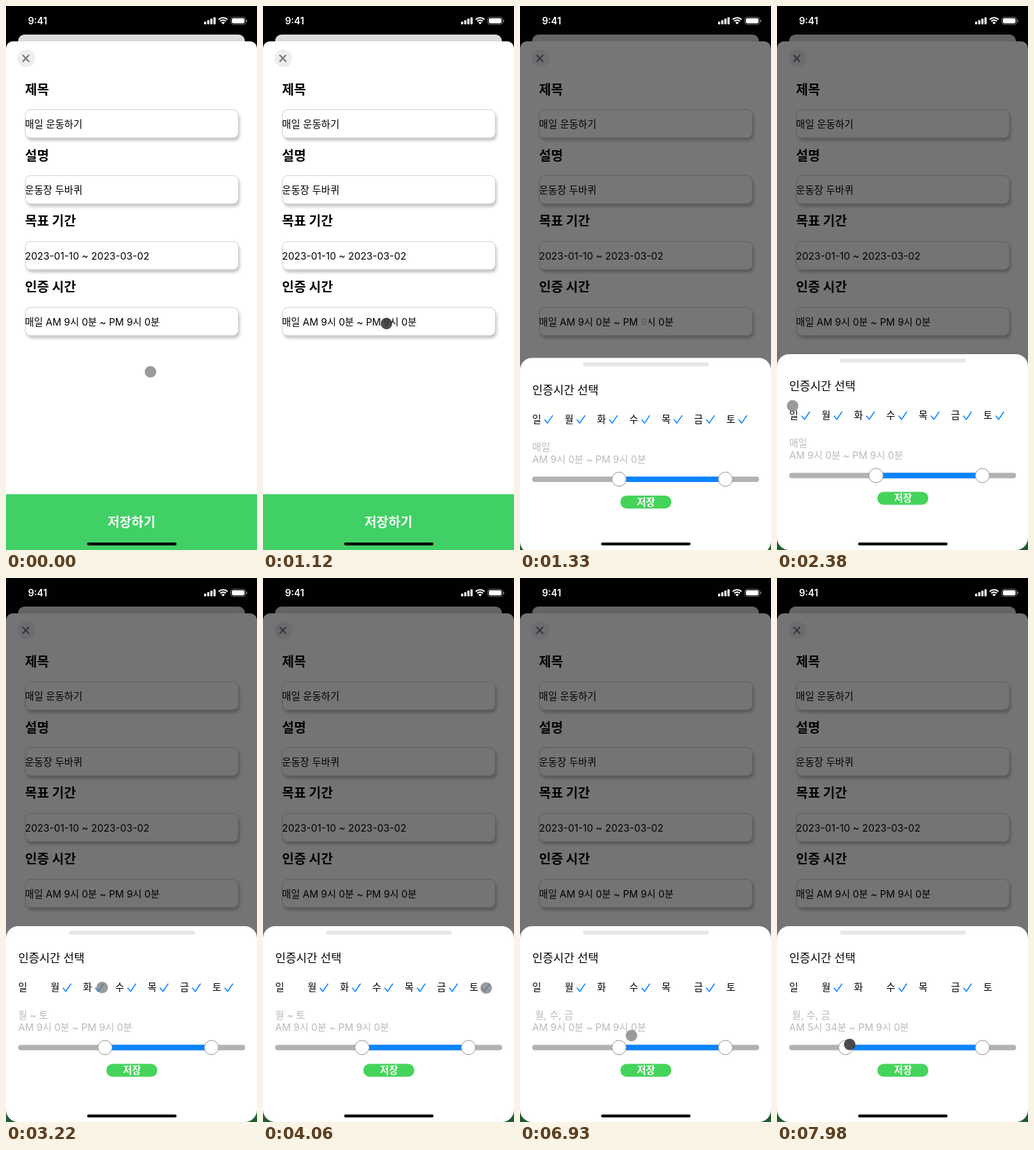
An HTML page with a canvas for the animation above (8 s loop, 370 by 800 pixels).

```html
<!DOCTYPE html>
<html lang="ko">
<head>
<meta charset="utf-8">
<title>인증시간 선택</title>
<style>
html, body { margin: 0; width: 100%; height: 100%; overflow: hidden; background: #000; }
canvas { display: block; width: 370px; height: 800px; }
</style>
</head>
<body>
<canvas id="stage"></canvas>
<script>
const W = 370, H = 800, LOOP = 8000, STEP = 70;
const FONT = 'Inter, "Noto Sans CJK KR", "Noto Sans CJK", sans-serif';
const BLUE = '#0a84ff', GREEN = '#40d066';
const canvas = document.getElementById('stage');
const ctx = canvas.getContext('2d');
const dpr = window.devicePixelRatio || 1;
canvas.width = W * dpr;
canvas.height = H * dpr;

const DAYS = [...'일월화수목금토'];
const OPEN_AT = 1130, DRAG_AT = 7210, DRAG_END = 7980;
const UNCHECK = { 0: 2730, 6: 4270, 2: 5390, 4: 6370 };
const PRESSES = [[1050, 1190], [2590, 2730], [4130, 4270], [5250, 5390], [6230, 6370], [7140, 9000]];
// time, x, y of the touch dot
const PATH = [
  [0, 213, 538], [560, 193, 488], [630, 193, 488], [1050, 182, 467],
  [1610, 182, 466], [2380, 23, 588], [2590, 40, 602], [2800, 40, 602],
  [3850, 329, 603], [4340, 329, 603], [5180, 137, 604], [5600, 137, 604],
  [6200, 231, 603], [6510, 231, 603], [7070, 152, 686], [8000, 152, 686]
];

const clamp = v => Math.max(0, Math.min(1, v));
const smooth = u => u * u * (3 - 2 * u);

function rect(x, y, w, h, r, fill) {
  ctx.beginPath();
  ctx.roundRect(x, y, w, h, r);
  ctx.fillStyle = fill;
  ctx.fill();
}

function circle(x, y, r, fill) {
  ctx.beginPath();
  ctx.arc(x, y, r, 0, Math.PI * 2);
  ctx.fillStyle = fill;
  ctx.fill();
}

function line(points, color, width) {
  ctx.beginPath();
  points.forEach(p => ctx.lineTo(p[0], p[1]));
  ctx.strokeStyle = color;
  ctx.lineWidth = width;
  ctx.lineCap = ctx.lineJoin = 'round';
  ctx.stroke();
}

// y is the middle of the line of text
function text(str, x, y, size, weight = 400, color = '#000', align = 'left') {
  ctx.font = `${weight} ${size}px ${FONT}`;
  ctx.textAlign = align;
  ctx.fillStyle = color;
  ctx.fillText(str, x, y + size * 0.37);
}

function statusBar() {
  text('9:41', 46.5, 21.5, 14, 600, '#fff', 'center');
  for (let i = 0; i < 4; i++) {
    const h = 4 + i * 2.2;
    rect(292 + i * 4.6, 27 - h, 3.2, h, 1, '#fff');
  }
  ctx.strokeStyle = '#fff';
  ctx.lineCap = 'butt';
  ctx.lineWidth = 2.1;
  for (const r of [9.2, 5.8]) {
    ctx.beginPath();
    ctx.arc(320, 26.5, r, -Math.PI * 0.75, -Math.PI * 0.25);
    ctx.stroke();
  }
  ctx.beginPath();
  ctx.moveTo(320, 27);
  ctx.arc(320, 27, 3.6, -Math.PI * 0.75, -Math.PI * 0.25);
  ctx.fillStyle = '#fff';
  ctx.fill();
  ctx.beginPath();
  ctx.roundRect(331.5, 16.5, 21.5, 10.5, 3.2);
  ctx.strokeStyle = 'rgba(255,255,255,.45)';
  ctx.lineWidth = 1;
  ctx.stroke();
  rect(333, 18, 18.5, 7.5, 2, '#fff');
  rect(354, 20, 1.4, 4, 0.7, 'rgba(255,255,255,.5)');
}

function field(i, title, value, size) {
  const y = 152.5 + i * 96.9;
  text(title, 28, y - 30, 19.2, 700);
  ctx.save();
  ctx.shadowColor = 'rgba(0,0,0,.24)';
  ctx.shadowBlur = 4 * dpr;
  ctx.shadowOffsetX = 2 * dpr;
  ctx.shadowOffsetY = 4 * dpr;
  rect(28.5, y, 314, 41.5, 8, '#fff');
  ctx.restore();
  ctx.strokeStyle = '#d2d2d4';
  ctx.lineWidth = 1;
  ctx.stroke();
  text(value, 28, y + 21, size);
}

function form() {
  rect(18, 42, 334, 30, 9, '#dcdcdc');
  rect(0, 52, W, H, 10, '#fff');
  circle(30, 77, 13, '#eeeeef');
  line([[25, 72.5], [33.5, 81.5]], '#77777c', 2);
  line([[33.5, 72.5], [25, 81.5]], '#77777c', 2);
  field(0, '제목', '매일 운동하기', 14.6);
  field(1, '설명', '운동장 두바퀴', 14.6);
  field(2, '목표 기간', '2023-01-10 ~ 2023-03-02', 14.6);
  field(3, '인증 시간', '매일 AM 9시 0분 ~ PM 9시 0분', 14.4);
  ctx.fillStyle = GREEN;
  ctx.fillRect(0, 718, W, 82);
  text('저장하기', 185, 759, 19.2, 700, '#fff', 'center');
}

function dayLabel(on) {
  const picked = DAYS.map((d, i) => i).filter(i => on[i]);
  const first = picked[0], last = picked[picked.length - 1];
  if (picked.length === 7) return '매일';
  if (last - first === picked.length - 1) return `${DAYS[first]} ~ ${DAYS[last]}`;
  return ' ' + picked.map(i => DAYS[i]).join(', ');
}

function clock(min) {
  const h = Math.floor(min / 60);
  return `${h < 12 ? 'AM' : 'PM'} ${h > 12 ? h - 12 : h}시 ${min % 60}분`;
}

const sliderX = min => 28.4 + min / 60 * 13.07;

function sheet(t, top, from) {
  const to = 21 * 60;
  const on = DAYS.map((d, i) => !(t >= UNCHECK[i]));
  ctx.save();
  ctx.translate(0, top);
  rect(0, 0, W, 288, 18, '#fff');
  rect(93, 6.5, 185.5, 6, 3, '#e7e7ea');
  text('인증시간 선택', 18, 47, 16.9, 500);
  DAYS.forEach((d, i) => {
    const x = 18 + i * 47.7;
    text(d, x, 90, 14.4);
    if (on[i]) line([[x + 18.5, 91], [x + 22.5, 96], [x + 30, 85]], BLUE, 1.5);
  });
  text(dayLabel(on), 18, 131, 14.4, 400, '#bababa');
  text(`${clock(from)} ~ ${clock(to)}`, 18, 149, 14.4, 400, '#bababa');
  const a = sliderX(from), b = sliderX(to);
  rect(18, 174.5, 334.5, 8, 4, '#b2b2b2');
  rect(a, 174.5, b - a, 8, 0, BLUE);
  for (const x of [a, b]) {
    circle(x, 178.5, 10.5, '#fff');
    ctx.strokeStyle = '#969696';
    ctx.lineWidth = 1;
    ctx.stroke();
  }
  rect(148, 202.5, 75, 19, 9, '#45d45b');
  text('저장', 185.7, 211.8, 14.4, 700, '#fff', 'center');
  ctx.restore();
}

function dotAt(t) {
  let i = 0;
  while (i < PATH.length - 2 && PATH[i + 1][0] <= t) i++;
  const [t0, x0, y0] = PATH[i], [t1, x1, y1] = PATH[i + 1];
  const u = smooth(clamp((t - t0) / (t1 - t0)));
  return [x0 + (x1 - x0) * u, y0 + (y1 - y0) * u];
}

function dot(t, from) {
  let [x, y] = dotAt(t);
  if (t >= DRAG_AT) x = sliderX(from) + 6;
  const press = Math.max(...PRESSES.map(([a, b]) =>
    Math.min(clamp((t - a) / 70 + 0.5), clamp((b - t) / 70 + 0.5))));
  const shade = 120 - 64 * press;
  circle(x, y, 8.5, `rgba(${shade},${shade},${shade},${0.75 + 0.15 * press})`);
}

function draw(t) {
  ctx.setTransform(dpr, 0, 0, dpr, 0, 0);
  ctx.fillStyle = '#000';
  ctx.fillRect(0, 0, W, H);
  form();
  const drag = clamp((t - DRAG_AT) / (DRAG_END - DRAG_AT));
  const from = Math.round(540 - 206 * Math.pow(drag, 1.4));
  if (t > OPEN_AT) {
    const s = (t - OPEN_AT) * 0.0295;
    const left = (1 + s) * Math.exp(-s);
    ctx.fillStyle = `rgba(3,0,4,${0.55 * (1 - left)})`;
    ctx.fillRect(0, 0, W, H);
    sheet(t, 512 + 288 * left, from);
  }
  statusBar();
  rect(119.5, 789, 132, 4.2, 2.1, '#000');
  dot(t, from);
}

const start = performance.now();
function tick() {
  const t = (performance.now() - start) % LOOP;
  draw(Math.floor(t / STEP) * STEP);
  requestAnimationFrame(tick);
}
tick();
</script>
</body>
</html>
```
